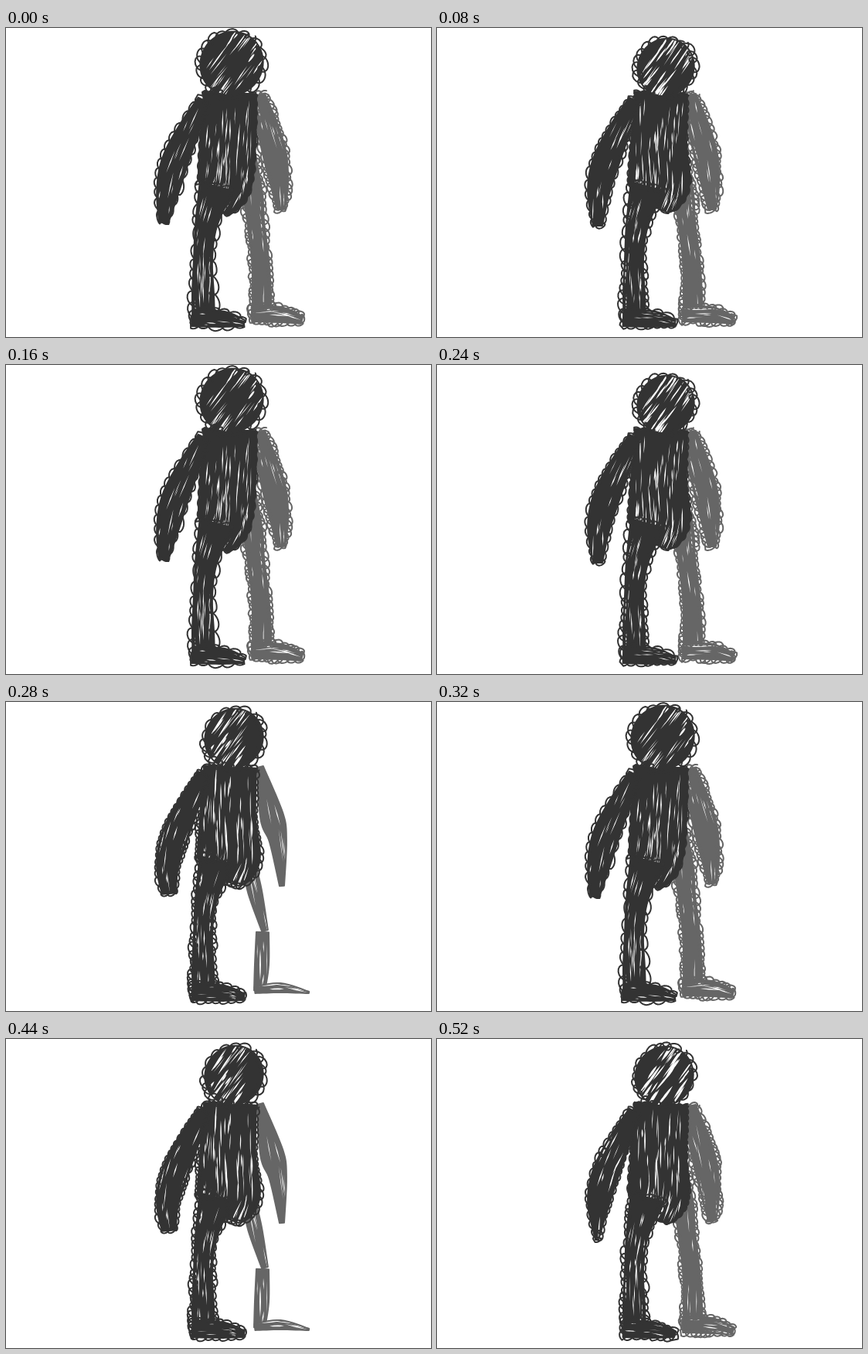
Write an HTML page with a canvas that moves like this. It is 550 px wide and 400 px high and loops after 560 ms.

```html
<!DOCTYPE html>
<html lang="en">
<head>
<meta charset="utf-8">
<title>Scribbled figure</title>
<style>
  html, body { margin: 0; width: 100%; height: 100%; overflow: hidden; background: #fff; }
  canvas { display: block; width: 550px; height: 400px; }
</style>
</head>
<body>
<canvas id="stage" width="550" height="400"></canvas>
<script>
const ctx = document.getElementById('stage').getContext('2d');
const DARK = '#333', GREY = '#666';
const STEP = 40, LOOP = 560, TAU = Math.PI * 2;

// Limbs are chains of joints [x, y, half width]
const LEG = [[272, 205, 22], [259, 255, 14], [255, 300, 12], [255, 345, 14], [256, 378, 14]];
const FOOT = [[241, 375, 11], [282, 377, 10], [308, 382, 4]];
const FAR_ARM = [[330, 86, 5], [338, 125, 13], [348, 165, 15], [354, 205, 11], [356, 235, 5]];
const FAR_LEG = [[318, 170, 6], [320, 215, 12], [323, 250, 11], [329, 300, 11], [331, 345, 12], [331, 370, 12]];
const FAR_FOOT = [[318, 371, 9], [354, 371, 10], [383, 378, 5]];
const THIN_ARM = [[329, 84, 4], [344, 148, 15], [352, 180, 11], [357, 238, 3]];
const THIN_LEG = [[314, 208, 8], [322, 245, 9], [335, 296, 4]];
const THIN_SHIN = [[332, 298, 8], [331, 340, 9], [328, 374, 7]];
const THIN_FOOT = [[322, 373, 4], [355, 370, 6], [392, 376, 1]];

// Head and hand are [x, y, size]; hem is the right end of the torso
const poses = [
  { head: [292, 46, 40], hem: 316, hand: [204, 252, 6], pitch: 16, shine: 1.5 },
  { head: [294, 48, 37], hem: 325, hand: [207, 260, 2], pitch: 10, shine: 2.6 },
  { head: [296, 51, 36], hem: 326, hand: [208, 256, 6], pitch: 12, shine: 2.2 },
  { head: [295, 47, 37], hem: 328, hand: [211, 248, 9], pitch: 8, shine: 1.9, thin: true }
];

function random(seed) {
  return () => (seed = seed * 16807 % 2147483647) / 2147483647;
}

// Catmull-Rom curve through all joints
function chain(joints) {
  const last = joints.length - 1, out = [];
  for (let i = 0; i < last; i++) {
    const [a, b, c, d] = [-1, 0, 1, 2].map(k => joints[Math.min(last, Math.max(0, i + k))]);
    for (let t = 0; t < 1; t += 0.125) {
      out.push(b.map((_, k) => b[k] + 0.5 * t * (c[k] - a[k] +
        t * (2 * a[k] - 5 * b[k] + 4 * c[k] - d[k] + t * (3 * (b[k] - c[k]) + d[k] - a[k])))));
    }
  }
  return [...out, joints[last]];
}

// Round shape whose spine runs along the diagonal hatching
function ball([x, y, r]) {
  const tilt = 2.2, n = 24;
  return Array.from({ length: n + 1 }, (_, k) => {
    const a = Math.PI * k / n, d = -(r + 2) * Math.cos(a);
    return [x + d * Math.cos(tilt), y + d * Math.sin(tilt), r * Math.sin(a)];
  });
}

// Unit direction of the spine at each point
function directions(spine) {
  return spine.map((_, i) => {
    const a = spine[Math.max(0, i - 1)], b = spine[Math.min(spine.length - 1, i + 1)];
    const len = Math.hypot(b[0] - a[0], b[1] - a[1]);
    return [(b[0] - a[0]) / len, (b[1] - a[1]) / len];
  });
}

function outline(spine, dirs) {
  const side = s => spine.map(([x, y, w], i) => [x - s * w * dirs[i][1], y + s * w * dirs[i][0]]);
  return [...side(-1), ...side(1).reverse()];
}

function trace(pts) {
  const path = new Path2D();
  pts.forEach(([x, y]) => path.lineTo(x, y));
  return path;
}

// Uneven loops running around the outline
function curls(edge, r, pitch, rnd) {
  const pts = [];
  let turn = 0, size = r, goal = r, pace = 1;
  edge.forEach(([x, y], i) => {
    const [u, v] = edge[(i + 1) % edge.length];
    const len = Math.hypot(u - x, v - y), steps = Math.ceil(len / pitch * 14);
    const tx = (u - x) / len, ty = (v - y) / len;
    for (let k = 0; k < steps; k++) {
      if (rnd() < 0.1) {
        goal = r * (0.4 + 1.1 * rnd());
        pace = 0.6 + 0.8 * rnd();
      }
      size += (goal - size) * 0.15;
      turn += pace * len / steps / pitch * TAU;
      const out = size * (Math.cos(turn) + 0.1), along = size * Math.sin(turn) + out * 0.3;
      const d = len * k / steps + along;
      pts.push([x + tx * d + ty * out, y + ty * d - tx * out]);
    }
  });
  return trace(pts);
}

// Slim gaps between the pen strokes, lying along the spine
function gaps(spine, dirs, { count, width, length }, rnd) {
  const path = new Path2D();
  for (let i = 0; i < count; i++) {
    const k = Math.floor(spine.length * (0.12 + 0.76 * rnd()));
    const [x, y, w] = spine[k], [dx, dy] = dirs[k];
    const shift = w * 1.7 * (rnd() - 0.5), l = length * (0.15 + 0.4 * rnd());
    const b = width * (0.4 + 0.9 * rnd()), bend = (rnd() - 0.5) * 0.12;
    const cx = x - dy * shift, cy = y + dx * shift;
    const lx = (dx - dy * bend) * l, ly = (dy + dx * bend) * l;
    path.moveTo(cx - lx, cy - ly);
    path.quadraticCurveTo(cx - dy * b, cy + dx * b, cx + lx, cy + ly);
    path.quadraticCurveTo(cx + dy * b, cy - dx * b, cx - lx, cy - ly);
  }
  return path;
}

function figure({ head, hem, hand, pitch, shine, thin }, index) {
  const rnd = random(7919 * (index + 1));
  const part = (colour, spine, r, pitch, count, width = 1.3, length = 32) => {
    const dirs = directions(spine), edge = outline(spine, dirs), body = trace(edge);
    body.closePath();
    return {
      colour, body,
      curl: r ? curls(edge, r, pitch, rnd) : new Path2D(),
      holes: gaps(spine, dirs, { count, width, length }, rnd)
    };
  };
  const torso = [[290, 84, 34], [287, 150, 36], [(hem + 248) / 2, 205, (hem - 248) / 2], [hem - 48, 230, 22]];
  const arm = [[255, 93, 7], [235, 135, 14], [218, 175, 17], [209, 213, 14], hand];
  const far = thin
    ? [THIN_ARM, THIN_LEG, THIN_SHIN, THIN_FOOT].map(j => part(GREY, chain(j), 0, 1, 5, 1.5, 45))
    : [FAR_LEG, FAR_FOOT, FAR_ARM].map(j => part(GREY, chain(j), 4, 8, 8, 1.1));
  return [
    ...far,
    part(DARK, chain(torso), thin ? 3.5 : 1.5, pitch, 60, 1.4, 36),
    part(DARK, chain(LEG), 4.5, pitch, 22),
    part(DARK, chain(FOOT), 3.5, pitch, 8, 1, 16),
    part(DARK, chain(arm), 3, pitch, 12),
    part(DARK, ball(head), 5, 11, 36, shine, 36)
  ];
}

function paint({ colour, body, curl, holes }) {
  ctx.fillStyle = ctx.strokeStyle = colour;
  ctx.fill(body);
  ctx.save();
  ctx.clip(body);
  ctx.fillStyle = '#fff';
  ctx.fill(holes);
  ctx.restore();
  ctx.stroke(body);
  ctx.stroke(curl);
}

const figures = poses.map(figure);
ctx.lineJoin = ctx.lineCap = 'round';
ctx.lineWidth = 2;
let shown = -1;

function draw() {
  const pose = Math.floor(performance.now() % LOOP / STEP) % figures.length;
  if (pose !== shown) {
    shown = pose;
    ctx.fillStyle = '#fff';
    ctx.fillRect(0, 0, 550, 400);
    figures[pose].forEach(paint);
  }
  requestAnimationFrame(draw);
}
draw();
</script>
</body>
</html>
```
